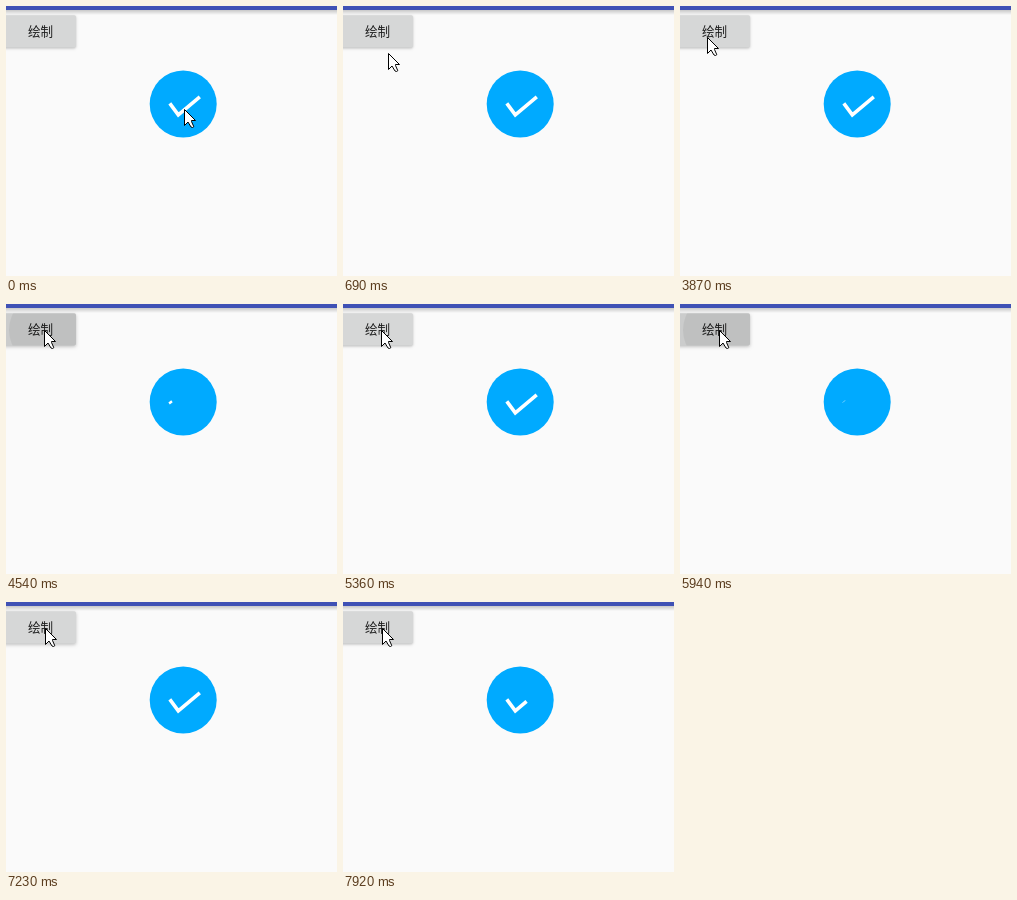
Animation of 331 by 270 pixels, one loop 8000 ms. Source, as an HTML page with a canvas:

```html
<!DOCTYPE html>
<html lang="zh-CN">
<head>
<meta charset="utf-8">
<title>绘制</title>
<style>
html, body { margin: 0; width: 100%; height: 100%; overflow: hidden; background: #fafafa; }
canvas { display: block; width: 331px; height: 270px; }
</style>
</head>
<body>
<canvas id="stage" width="331" height="270"></canvas>
<script>
const ctx = document.getElementById('stage').getContext('2d');
const LOOP = 8000;
const STEP = 135;
const DRAW_TIME = 1000;
const CLICKS = [4390, 5840, 7300];

const CHECK = [[163.8, 97.4], [172.3, 108.8], [193.8, 90.9]];
const ARROW = [[0, 0], [0, 16], [3.5, 12.5], [6.5, 17.5], [8, 18], [9.3, 17.2], [7, 12], [7, 11], [11, 11]];

// Pointer paths as time, x, y; it is off stage outside them.
const LEAVE = [[0, 178, 103], [360, 86, 67], [495, 46, 52], [1035, 43, 32], [1305, 218, 241]];
const RETURN = [[3870, 27, 31], [4140, 38, 26], [5500, 38, 26], [5640, 39, 26], [LOOP, 39, 26]];

const ease = p => (1 - Math.cos(Math.PI * p)) / 2;
const lerp = (a, b, k) => a.map((v, i) => v + (b[i] - v) * k);
const dist = (a, b) => Math.hypot(b[0] - a[0], b[1] - a[1]);

function trace(points) {
  ctx.beginPath();
  points.forEach(([x, y]) => ctx.lineTo(x, y));
}

function disc(x, y, r, color) {
  ctx.fillStyle = color;
  ctx.beginPath();
  ctx.arc(x, y, r, 0, 2 * Math.PI);
  ctx.fill();
}

function drawBar() {
  const fade = ctx.createLinearGradient(0, 4, 0, 9);
  fade.addColorStop(0, 'rgba(0,0,0,.2)');
  fade.addColorStop(1, 'rgba(0,0,0,0)');
  ctx.fillStyle = fade;
  ctx.fillRect(0, 4, 331, 5);
  ctx.fillStyle = '#3f51b5';
  ctx.fillRect(0, 0, 331, 4);
}

function drawButton(age) {
  const lift = age > -80 && age < 210 ? 1 : 0;
  ctx.save();
  ctx.beginPath();
  ctx.roundRect(-4, 9.2, 74, 32.4, 1.8);
  ctx.shadowColor = 'rgba(0,0,0,.24)';
  ctx.shadowBlur = 2.5 + lift;
  ctx.shadowOffsetY = .8 + .4 * lift;
  ctx.fillStyle = '#d6d7d7';
  ctx.fill();
  ctx.shadowColor = 'transparent';
  if (age > 40 && age < 180) {
    ctx.clip();
    ctx.fillStyle = 'rgba(0,0,0,.05)';
    ctx.fillRect(0, 9, 70, 33);
    disc(39, 26, 36, 'rgba(0,0,0,.06)');
  }
  ctx.restore();

  ctx.fillStyle = 'rgba(0,0,0,.87)';
  ctx.font = '12.6px "Noto Sans CJK SC", "Noto Sans CJK", sans-serif';
  ctx.fillText('绘制', 22, 30.2);
}

function drawBadge(age) {
  disc(177.2, 98, 33.5, '#00aaff');
  const [a, b, c] = CHECK;
  const first = dist(a, b), second = dist(b, c);
  const progress = age < 0 ? 1 : ease(Math.min(1, age / DRAW_TIME));
  const length = progress * (first + second);
  trace(length < first
    ? [a, lerp(a, b, length / first)]
    : [a, b, lerp(b, c, (length - first) / second)]);
  ctx.strokeStyle = '#fff';
  ctx.lineWidth = 3.6;
  ctx.lineJoin = 'miter';
  ctx.stroke();
}

function drawPointer(t) {
  const path = t < 2000 ? LEAVE : RETURN;
  const next = path.findIndex(p => p[0] > t);
  if (next < 1) return;
  const from = path[next - 1], to = path[next];
  const [, x, y] = lerp(from, to, (t - from[0]) / (to[0] - from[0]));
  ctx.save();
  ctx.translate(Math.round(x) + .5, Math.round(y) + .5);
  trace(ARROW);
  ctx.closePath();
  ctx.fillStyle = '#fff';
  ctx.fill();
  ctx.strokeStyle = '#000';
  ctx.lineWidth = 1;
  ctx.stroke();
  ctx.restore();
}

function frame(now) {
  const step = Math.floor((now % LOOP - 60) / STEP);
  const t = Math.max(0, step * STEP + 90);
  // Time since the click; slightly negative while the button is held down.
  const age = t - (CLICKS.filter(c => c - 80 < t).pop() ?? -LOOP);
  ctx.fillStyle = '#fafafa';
  ctx.fillRect(0, 0, 331, 270);
  drawBar();
  drawButton(age);
  drawBadge(age);
  drawPointer(t);
  requestAnimationFrame(frame);
}
requestAnimationFrame(frame);
</script>
</body>
</html>
```
